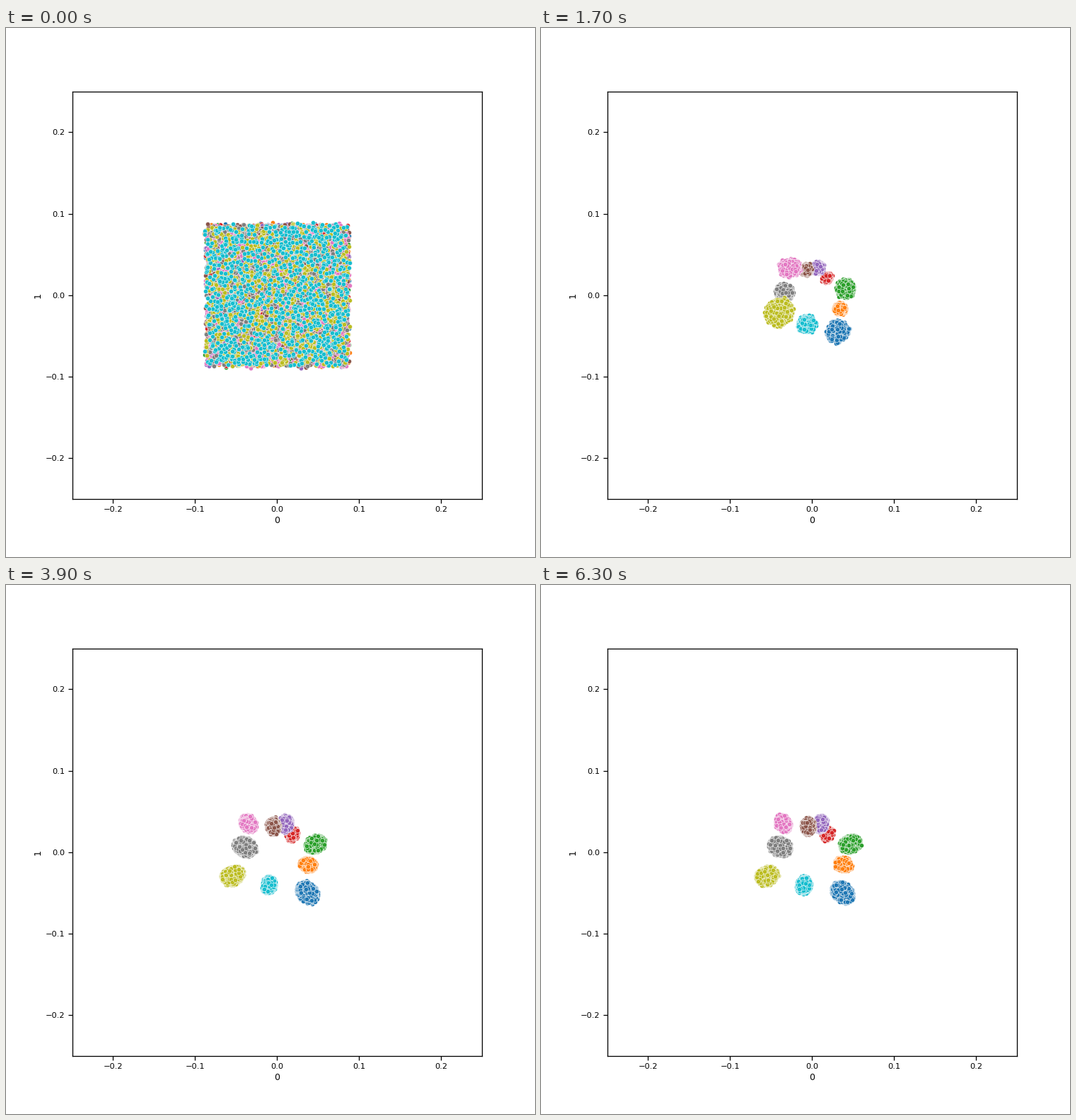
A matplotlib script for the animation above (6400 ms loop, 748 by 748 pixels).

```python
import numpy as np
import matplotlib.pyplot as plt
from matplotlib.animation import FuncAnimation

FRAMES, GATHER, DRIFT = 64, 11, 6.0      # frame count, gathering time, drift constant
COUNT, HALF = 1000, 0.0865               # dots per group, half side of the start square
ORIGIN = np.array([383.35, 377.75])      # pixel position of the data origin
SCALE = np.array([1159.4, -1151.8])      # pixels per data unit
HUB = np.array([380, 387])
POCKET, POCKET_R = np.array([355, 387]), 13

# colour, gathered centre and radius, settled centre and radius (pixels)
GROUPS = [
    ("blue", (408, 419), 21, (426, 434.5), 14),
    ("orange", (415, 400), 6.5, (427, 395), 9.7),
    ("green", (418, 371.5), 15, (437, 366), 12.2),
    ("red", (402, 354), 5, (405, 352), 7.3),
    ("purple", (384, 342), 7, (395, 337.5), 9.6),
    ("brown", (369, 342), 5, (377.5, 341), 9.3),
    ("pink", (369, 342), 22.5, (342, 337), 10.4),
    ("gray", (355, 379), 11.5, (337.5, 370), 13.7),
    ("olive", (366, 385), 36, (319.5, 411), 13.3),
    ("cyan", (382, 409), 17, (371.5, 424), 9.7),
]

rng = np.random.default_rng(7)


def blob(center, radius, stretch):
    """Random points in an ellipse lengthened along the line from the hub."""
    out = np.subtract(center, HUB)
    out = out / np.hypot(*out)
    side = np.array([-out[1], out[0]])
    r, a = radius * np.sqrt(rng.random(COUNT)), rng.uniform(0, 2 * np.pi, COUNT)
    return (center + np.outer(r * np.cos(a) * stretch, out)
            + np.outer(r * np.sin(a) / stretch, side))


def gathered(center, radius):
    """The farther from the hub, the more a group wraps around it."""
    distance = np.hypot(*np.subtract(center, HUB))
    return blob(center, radius, 1 / (1 + distance / 150))


def clear_pocket(pts):
    """Push points near the pocket out to its rim."""
    d = pts - POCKET
    dist = np.hypot(*d.T)[:, None]
    return np.where(dist < POCKET_R, POCKET + d / dist * (POCKET_R + dist / 2), pts)


def square():
    pts = rng.uniform(-HALF, HALF, (COUNT, 2)) + rng.normal(0, 0.0013, (COUNT, 2))
    return ORIGIN + pts * SCALE


plt.rcParams.update({
    "font.size": 12, "axes.labelsize": 12, "axes.linewidth": 1.25,
    "xtick.labelsize": 11, "ytick.labelsize": 11,
    "xtick.major.size": 6, "ytick.major.size": 6,
    "xtick.major.width": 1.25, "ytick.major.width": 1.25,
})
fig, ax = plt.subplots(figsize=(10, 10), dpi=74.8)
fig.subplots_adjust(left=0.125, right=0.9, bottom=0.11, top=0.88)
ticks = np.arange(-2, 3) / 10
ax.set(xlim=(-0.25, 0.25), ylim=(-0.25, 0.25), xlabel="0", ylabel="1",
       xticks=ticks, yticks=ticks)

clouds = []
for color, mid, mid_r, end, end_r in GROUPS:
    dots = ax.scatter([], [], s=36, color=f"tab:{color}", edgecolor="white",
                      linewidth=0.48)
    start, middle, final = square(), gathered(mid, mid_r), blob(end, end_r, 1.15)
    if color == "olive":
        middle = clear_pocket(middle)
    clouds.append((dots, start, middle, final))


def update(k):
    noise = np.random.default_rng(1000 + k)
    spread = max(0, 1 - k / GATHER) ** 2
    split = 1 - np.exp(-max(0, k - GATHER) / DRIFT)
    jitter = (0.6 + 0.4 * split) * (k > 0)
    for dots, start, middle, final in clouds:
        pts = middle + split * (final - middle)
        pts = pts + spread * (start - pts)
        pts = pts + noise.normal(0, 1, pts.shape) * jitter
        dots.set_offsets((pts - ORIGIN) / SCALE)
    return [cloud[0] for cloud in clouds]


anim = FuncAnimation(fig, update, frames=FRAMES, interval=100,
                     init_func=lambda: update(0), repeat=True, repeat_delay=0)
plt.show()
```
